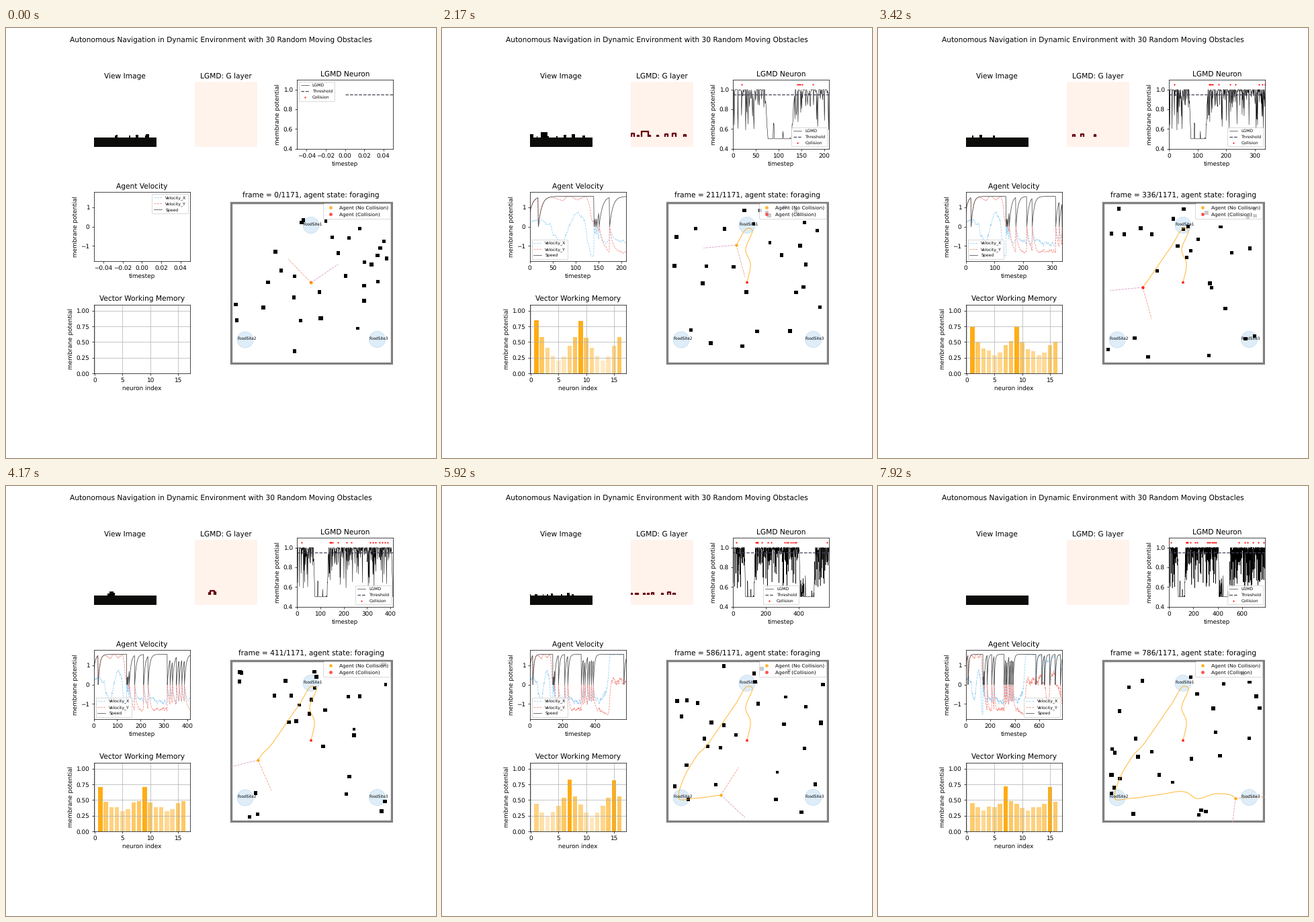
Recreate the animation shown at these times as a matplotlib script. Size 640x640 px, loop 8 s.

```python
import numpy as np
import matplotlib.pyplot as plt
from matplotlib.animation import FuncAnimation
from matplotlib.collections import PolyCollection
from matplotlib.patches import Circle, Rectangle

SIZE, FRAMES, LOOP = 640, 96, 8000
plt.rcParams.update({"font.family": "DejaVu Sans", "text.hinting": "none"})
rng = np.random.default_rng(11)
T = np.arange(800)


def smooth(v, width):
    half = width // 2
    return np.convolve(np.pad(v, half, mode="edge"), np.ones(width) / width, "valid")


def spline(t, v):
    """Smooth curve through (t, v), with slopes taken from the neighbours."""
    slope = np.gradient(v, t)
    j = np.clip(np.searchsorted(t, T, side="right") - 1, 0, len(t) - 2)
    h = t[j + 1] - t[j]
    u = (T - t[j]) / h
    return (v[j] * (1 + 2 * u) * (1 - u) ** 2 + slope[j] * h * u * (1 - u) ** 2
            + v[j + 1] * u * u * (3 - 2 * u) + slope[j + 1] * h * u * u * (u - 1))


# ---- agent: position, heading, speed
ROUTE = np.array([
    (0, 454, 379), (50, 459, 350), (88, 452, 329), (125, 462, 301), (145, 456, 298),
    (211, 438, 323), (336, 394, 386), (411, 375, 408), (440, 362, 430),
    (478, 352, 464), (520, 374, 465), (586, 415, 460), (655, 459, 456),
    (686, 474, 465), (735, 503, 458), (786, 532, 465), (799, 536, 472)], float)
px, py = spline(ROUTE[:, 0], ROUTE[:, 1]), spline(ROUTE[:, 0], ROUTE[:, 2])
heading = smooth(np.unwrap(np.arctan2(-np.gradient(py), np.gradient(px))), 9)
heading += smooth(rng.normal(0, .15, T.size), 5)

HITS = np.array([19, 141, 144, 147, 152, 175, 213, 232, 314, 326, 336, 353,
                 364, 376, 387, 573, 621, 643, 686, 730, 773])
last = np.array([max([h for h in HITS if h <= t], default=-4) for t in T])
speed = 1.57 * (1 - np.exp(-(T - last) / 7))
vel_x, vel_y = speed * np.cos(heading), speed * np.sin(heading)

# ---- membrane potential: near 1 with sharp dips, low in two calm spells
calm = smooth(((T > 73) & (T < 133) | (T > 407) & (T < 498)).astype(float), 7)
ripple = .2 * np.maximum(smooth(rng.random(T.size), 5) - .55, 0) / .2
dips = .42 * rng.random(T.size) ** 5
potential = np.clip(1 - dips - calm * (.5 - ripple), .5, 1)

# ---- obstacles: straight drift, bouncing off the walls, kept clear of the agent
COUNT, CLEAR = 30, 17
LOW, SPAN = np.array([339, 265]), np.array([231, 229])
origin = rng.random((COUNT, 2)) * 2 * SPAN
drift = rng.uniform(-.4, .4, (COUNT, 2))
box = rng.uniform(4.6, 6.2, (COUNT, 2))


def obstacles_at(n):
    pos = LOW + SPAN - np.abs((origin + drift * n) % (2 * SPAN) - SPAN)
    agent = np.array([px[n], py[n]])
    away = pos - agent
    dist = np.linalg.norm(away, axis=1, keepdims=True)
    return agent + away * np.maximum(1, CLEAR / np.maximum(dist, .1))


# ---- working memory: a cosine that flattens, leaving one peak per half
jitter = rng.uniform(-.06, .06, 8)


def memory_at(n):
    if n == 0:
        return np.zeros(16)
    since, peak = max(p for p in ((0, 2), (141, 0), (483, 6)) if p[0] <= n)
    cells = np.arange(8)
    fresh = np.exp(-(n - since) / 170)
    half = .43 + .32 * fresh * np.cos((cells - peak) * np.pi / 4) + (1 - fresh) * jitter
    half[peak] += .2
    return np.concatenate([half, half * .99])


# ---- figure
fig = plt.figure(figsize=(10, 10), dpi=SIZE / 10, facecolor="white")
fig.suptitle("Autonomous Navigation in Dynamic Environment with 30 Random Moving Obstacles")


def panel(x0, y0, x1, y1, title, pixels=False):
    ax = fig.add_axes([x0 / SIZE, 1 - y1 / SIZE, (x1 - x0) / SIZE, (y1 - y0) / SIZE])
    ax.set_title(title)
    if pixels:
        ax.set(xlim=(x0, x1), ylim=(y1, y0))
        ax.axis("off")
    return ax


def boxes(ax, **style):
    coll = PolyCollection([], **style)
    ax.add_collection(coll, autolim=False)
    return coll


def rect(x0, y0, x1, y1):
    return [(x0, y1), (x0, y0), (x1, y0), (x1, y1)]


GROUND, MID, SHIFT = 163, 177, 150.5
view = panel(130.5, 80, 223.5, 176.5, "View Image", True)
view.add_patch(Rectangle((130, GROUND), 94, 14, color="#0c0c0a", lw=0))
view_boxes = boxes(view, facecolor="black", lw=0)

PALE = "#fff3ec"
layer = panel(281, 80, 374, 176.5, "LGMD: G layer", True)
layer.add_patch(Rectangle((280, 79), 95, 98, color=PALE, lw=0))
layer_boxes = boxes(layer, closed=False, facecolor=PALE, edgecolor="#67000d", lw=2.6)

lgmd = panel(433, 77, 576, 179.5, "LGMD Neuron")
lgmd.set(ylim=(.4, 1.1), xlabel="timestep", ylabel="membrane potential")
lgmd_line, = lgmd.plot([], [], color="black", lw=.6, label="LGMD")
lgmd.plot([0, 1171], [.95, .95], "--", color="#46465a", lw=1.4, label="Threshold")
hit_dots, = lgmd.plot([], [], "o", color="red", ms=2.4, mew=0, label="Collision")
lgmd_legend = lgmd.legend(loc="upper left", fontsize="x-small")

vel = panel(130.5, 244, 274, 347, "Agent Velocity")
vel.set(ylim=(-1.8, 1.8), xlabel="timestep", ylabel="membrane potential")
vel_lines = [vel.plot([], [], style, color=color, lw=.9, label=label)[0]
             for style, color, label in (("--", "#9ad0f5", "Velocity_X"),
                                         ("--", "#f58a80", "Velocity_Y"),
                                         ("-", "#505050", "Speed"))]
vel_legend = vel.legend(loc="upper right", fontsize="x-small")

mem = panel(130.5, 411.5, 274, 514, "Vector Working Memory")
bars = mem.bar(np.arange(1, 17), np.zeros(16), color="orange")
mem.set(xlim=(-.19, 17.19), ylim=(0, 1.1), xlabel="neuron index",
        ylabel="membrane potential")
mem.grid(True)

arena = panel(332.5, 257.5, 576, 500.5, "", True)
arena.add_patch(Rectangle((334.5, 259.5), 239.5, 239, fill=False, ec="gray", lw=3.8))
for k, (cx, cy) in enumerate([(454, 293.5), (356, 464), (552.5, 463.5)], 1):
    arena.add_patch(Circle((cx, cy), 12, fc="#deedf8", ec="#bcd9ee", lw=.7))
    arena.text(cx - 12, cy - 1.5, f"FoodSite{k}", fontsize=6.5, va="center", zorder=5)
arena_boxes = boxes(arena, facecolor="black", lw=0, zorder=2)
trail, = arena.plot([], [], color="orange", lw=1.2, alpha=.75)
sight = [arena.plot([], [], "--", color=c, lw=1)[0] for c in ("#f2a08c", "#dc9cc8")]
arena.plot([454], [379], "*", color="red", ms=6, mew=0)
agent_dot, = arena.plot([], [], "o", ms=5, mew=0, alpha=.85)
keys = [plt.Line2D([], [], ls="", marker="o", ms=5.5, mew=0, color=c, label=s)
        for c, s in (("#ffb732", "Agent (No Collision)"), ("#ff5050", "Agent (Collision)"))]
arena.legend(handles=keys, loc="upper right", fontsize="small").set_zorder(6)


def seen_boxes(n, pos):
    """Boxes as the agent sees them, far to near: bearing to x, nearness to size."""
    dx, dy = pos[:, 0] - px[n], py[n] - pos[:, 1]
    off = np.degrees(heading[n] - np.arctan2(dy, dx))
    x = MID + .93 * ((off + 180) % 360 - 180)
    dist = np.hypot(dx, dy)
    half, high = 27 * box[:, 0] / dist, 56 * box[:, 1] / dist
    return [rect(x[j] - half[j], GROUND - high[j], x[j] + half[j], GROUND)
            for j in np.argsort(-dist) if abs(x[j] - MID) < 46.5 + half[j]]


def lgmd_corner(n):
    """Keep the legend off the calm spells."""
    if n == 0:
        return "upper left"
    if 80 <= n < 197:
        return "lower left"
    if 420 < n < 590:
        return "lower center"
    return "center" if 590 <= n < 780 else "lower right"


def draw(k):
    n = max(0, 5 * (k * 5 // 3) - 4)
    m = n + 1 if n else 0
    t = T[:m]

    for ax in (lgmd, vel):
        ax.set_xlim((0, n) if n else (-.05, .05))
    lgmd_line.set_data(t, potential[:m])
    past = HITS[HITS <= n]
    hit_dots.set_data(past, np.full(len(past), 1.05))
    for line, v in zip(vel_lines, (vel_x, vel_y, speed)):
        line.set_data(t, v[:m])
    lgmd_legend.set_loc(lgmd_corner(n))
    vel_legend.set_loc("upper right" if n == 0 else
                       "lower left" if n < 590 else "lower right")

    values = memory_at(n)
    for bar, v in zip(bars, values):
        bar.set_height(v)
        bar.set_alpha(.92 * v / max(values.max(), .01))

    pos = obstacles_at(n)
    arena_boxes.set_verts([rect(*(p - b / 2), *(p + b / 2)) for p, b in zip(pos, box)])
    seen = seen_boxes(n, pos)
    view_boxes.set_verts(seen)
    layer_boxes.set_verts([np.add(s, (SHIFT, -1)) for s in seen] if n else [],
                          closed=False)

    x, y = px[n], py[n]
    trail.set_data(px[:m], py[:m])
    for line, turn in zip(sight, (50, -50)):
        a = heading[n] + np.radians(turn)
        line.set_data([x, x + 49 * np.cos(a)], [y, y - 49 * np.sin(a)])
    agent_dot.set_data([x], [y])
    agent_dot.set_color("red" if 0 <= n - last[n] < 4 and n > 4 else "orange")
    arena.set_title(f"frame = {n}/1171, agent state: foraging")
    return []


anim = FuncAnimation(fig, draw, frames=FRAMES, interval=LOOP / FRAMES,
                     repeat=True, repeat_delay=0, blit=False)
plt.show()
```
